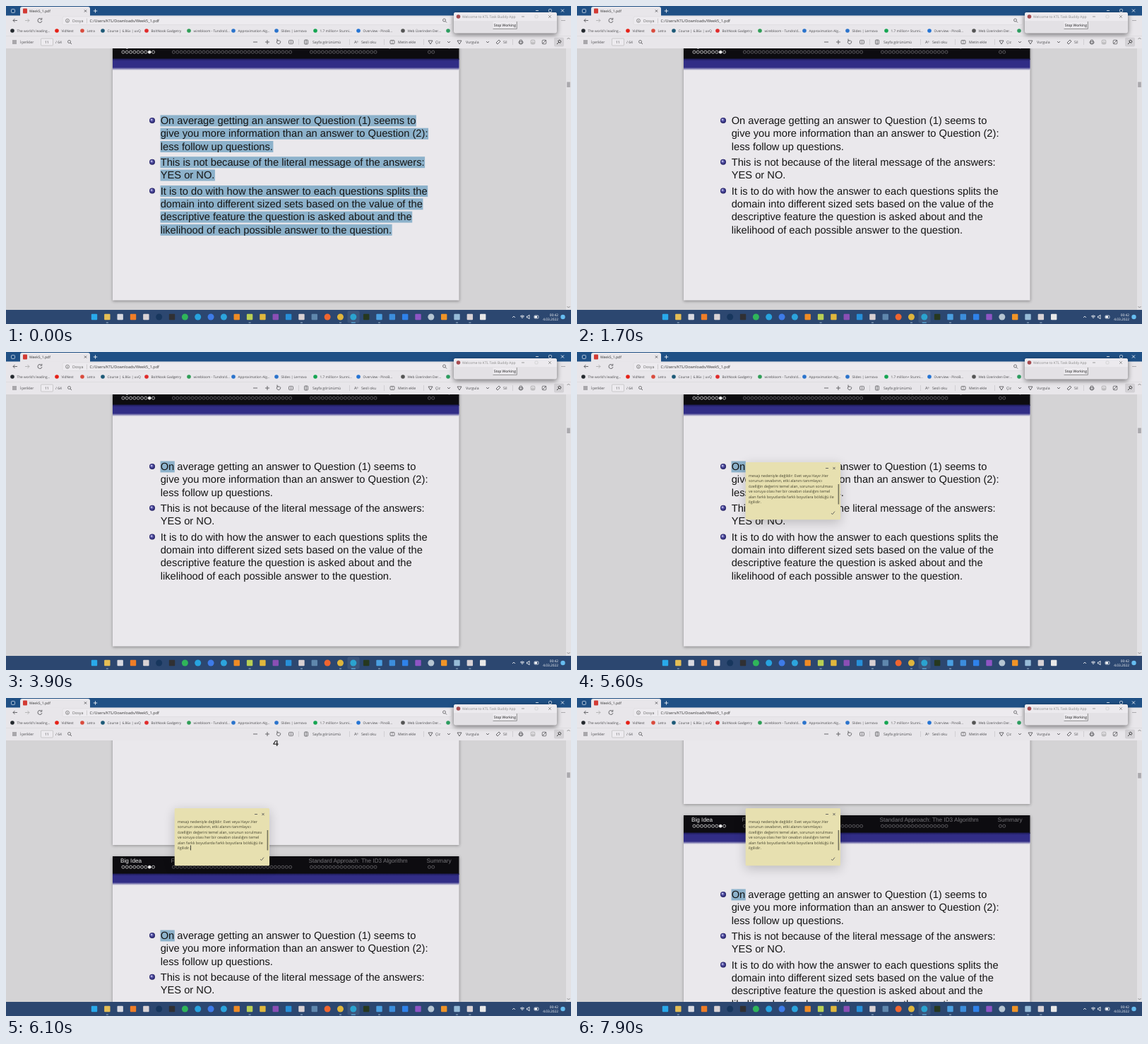
These frames come from a looping animation (800 px wide and 450 px high, 8 s). An HTML page with a canvas:

```html
<!DOCTYPE html>
<html lang="tr">
<head>
<meta charset="utf-8">
<style>
html, body { margin: 0; width: 100%; height: 100%; overflow: hidden; background: #d4d3d5 }
canvas { display: block }
</style>
</head>
<body>
<canvas width="800" height="450"></canvas>
<script>
const c = document.querySelector('canvas').getContext('2d');
c.textRendering = 'geometricPrecision';
const UI = '"Open Sans", "Noto Sans", sans-serif';
const HELV = '"Liberation Sans", Arial, sans-serif';
const PAGE = '#eae8ec', CHROME = '#e8e6ea', INK = '#4a4a4d', SELECTED = '#8db2cb';

function box(x, y, w, h, fill) {
  c.fillStyle = fill;
  c.fillRect(x, y, w, h);
}
function rounded(x, y, w, h, r, fill, stroke) {
  c.beginPath();
  c.roundRect(x, y, w, h, r);
  if (fill) { c.fillStyle = fill; c.fill(); }
  if (stroke) { c.strokeStyle = stroke; c.lineWidth = .7; c.stroke(); }
}
function disc(x, y, r, fill, stroke) {
  c.beginPath();
  c.arc(x, y, r, 0, 7);
  if (fill) { c.fillStyle = fill; c.fill(); }
  if (stroke) { c.strokeStyle = stroke; c.lineWidth = .7; c.stroke(); }
}
function arc(x, y, r, from, to, color) {
  c.beginPath();
  c.arc(x, y, r, from, to);
  c.strokeStyle = color;
  c.lineWidth = .8;
  c.stroke();
}
function text(s, x, y, size = 5, fill = INK, font = UI, align = 'left') {
  c.font = `${size}px ${font}`;
  c.textAlign = align;
  c.fillStyle = fill;
  c.fillText(s, x, y);
}
// Each argument after the colour is one polyline: [x, y, x, y, ...]
function lines(color, ...paths) {
  c.strokeStyle = color;
  c.lineWidth = .8;
  c.beginPath();
  for (const p of paths)
    for (let i = 0; i < p.length; i += 2) c[i ? 'lineTo' : 'moveTo'](p[i], p[i + 1]);
  c.stroke();
}
const dash = (x, y, r, col = INK) => lines(col, [x - r, y, x + r, y]);
const plus = (x, y, r, col = INK) => lines(col, [x - r, y, x + r, y], [x, y - r, x, y + r]);
const cross = (x, y, r, col = INK) => lines(col, [x - r, y - r, x + r, y + r], [x + r, y - r, x - r, y + r]);
const chevron = (x, y, d = 1, col = INK) => lines(col, [x - 2, y - d, x, y + d, x + 2, y - d]);
const frame = (x, y, w, h, col = INK) => rounded(x - w / 2, y - h / 2, w, h, 1, null, col);
const divider = x => box(x, 47, .6, 8, '#c2c0c4');
function magnifier(x, y) {
  disc(x - .5, y - .5, 2, null, INK);
  lines(INK, [x + 1, y + 1, x + 3, y + 3]);
}
function shadowed(color, blur, dy, paint) {
  c.save();
  c.shadowColor = color;
  c.shadowBlur = blur;
  c.shadowOffsetY = dy;
  paint();
  c.restore();
}

const body = [
  [167, 'On average getting an answer to Question (1) seems to', 1],
  [185.3, 'give you more information than an answer to Question (2):'],
  [203.6, 'less follow up questions.'],
  [225.8, 'This is not because of the literal message of the answers:', 1],
  [244.1, 'YES or NO.'],
  [266.6, 'It is to do with how the answer to each questions splits the', 1],
  [284.9, 'domain into different sized sets based on the value of the'],
  [303.2, 'descriptive feature the question is asked about and the'],
  [321.5, 'likelihood of each possible answer to the question.']
];
const sections = [
  ['Big Idea', 162, 9], ['Fundamentals', 233.5, 32],
  ['Standard Approach: The ID3 Algorithm', 428.5, 18], ['Summary', 595.5, 2]
];

const sheet = (y, h) => shadowed('#0005', 4, 1, () => box(151, y, 490.5, h, PAGE));

function bullet(x, y) {
  const g = c.createRadialGradient(x - 1.2, y - 1.4, .3, x, y, 4);
  g.addColorStop(0, '#d0d0ee');
  g.addColorStop(.4, '#5653a8');
  g.addColorStop(1, '#1d1a5c');
  disc(x, y, 4, g);
}

function slides(scroll, selection) {
  c.save();
  c.translate(0, scroll);
  sheet(-333, 367);
  text('4', 382, -106, 14.7, '#111', HELV, 'center');
  sheet(50, 366.5);

  box(151, 50, 490.5, 26, '#0d0c10');
  const g = c.createLinearGradient(0, 74.5, 0, 91);
  g.addColorStop(0, '#1c1a55');
  g.addColorStop(.2, '#312d86');
  g.addColorStop(.75, '#312d86');
  g.addColorStop(1, PAGE);
  box(151, 74.5, 490.5, 16.5, g);
  sections.forEach(([title, x, count], k) => {
    const col = k ? '#77767a' : '#f2f2f2';
    text(title, x, 59, 8.2, col, HELV);
    for (let i = 0; i < count; i++)
      disc(x + 3.9 + i * 5.33, 65.2, 2, !k && i == 7 ? '#fff' : null, col);
  });

  for (const [y, s, first] of body) {
    if (first) bullet(207, y - 5);
    const marked = selection == 'all' ? s : selection == 'word' && y == 167 ? 'On' : '';
    if (marked) {
      c.font = `14.7px ${HELV}`;
      box(218.5, y - 12.6, c.measureText(marked).width + .7, 16, SELECTED);
    }
    text(s, 218.7, y, 14.7, '#151515', HELV);
  }
  c.restore();
  box(793, 42, 7, 388, '#e2e1e4');
  box(794.2, 107.5 - scroll / 80, 4.6, 7.5, '#aaa9ad');
  chevron(796.5, 426, 1, '#777');
}

const noteLines = [
  'mesajı nedeniyle değildir: Evet veya Hayır.Her',
  'sorunun cevabının, etki alanını tanımlayıcı',
  'özelliğin değerini temel alan, sorunun sorulması',
  've soruya olası her bir cevabın olasılığını temel',
  'alan farklı boyutlarda farklı boyutlara böldüğü ile',
  'ilgilidir.'
];
function note(caret) {
  shadowed('#0003', 16, 4, () => rounded(238.7, 156, 134.3, 81.3, 1.5, '#e7e0b0'));
  dash(354, 164.5, 2);
  cross(364, 164.5, 1.6);
  noteLines.forEach((s, i) => text(s, 243, 177 + i * 7.45, 5.35, '#45432f'));
  if (caret) box(243.2 + c.measureText(noteLines[5]).width, 208.5, .8, 7, '#222');
  box(369.6, 187, 1.6, 28.5, '#77745c');
  lines(INK, [360, 228, 361.6, 229.8, 365, 225.6]);
}

const bookmarks = [
  [9, '#24292e', "The world's leading..."], [72, '#e62117', 'VidNest'],
  [108, '#d94b3d', 'Letra'], [137, '#1d5a78', 'Course | 6.86x | uvQ'],
  [199, '#e02a2a', 'BoltNook Gadgetry'], [259, '#2f9e57', "wirebloom - Tundra'd..."],
  [322, '#2a73cc', 'Approximation Alg...'], [383, '#2a73cc', 'Slides | Lernova'],
  [438, '#15a552', '1.7 million+ Stunni...'], [499, '#2474d4', 'Overview - PinoB...'],
  [562, '#555', 'Web Üzerinden Der...'], [626, '#2d9d60', '']
];
function browser() {
  box(0, 0, 800, 14, '#1f5085');
  frame(10, 7, 5, 5, '#e5edf5');
  rounded(20, 1, 99, 16, 3, CHROME);
  rounded(24, 3.5, 6, 7, 1, '#d33b34');
  text('Week5_1.pdf', 33, 8.8, 5, '#333');
  cross(112.5, 7, 1.6);
  plus(126.5, 7, 2.7, '#fff');
  dash(752, 6.5, 2, '#fff');
  frame(770.5, 6.5, 4, 4, '#fff');
  cross(788, 6.5, 2, '#fff');

  box(0, 13.5, 800, 46.5, CHROME);
  lines(INK, [16, 20.5, 10, 20.5], [12.5, 18, 10, 20.5, 12.5, 23]);
  lines('#aaa', [27, 20.5, 33, 20.5], [30.5, 18, 33, 20.5, 30.5, 23]);
  arc(48, 20.5, 3, .2, 5.4, INK);
  lines(INK, [50.8, 16.8, 50.8, 19.2, 48.4, 19.2]);
  rounded(80, 15, 551, 11.5, 2, '#edebef', '#dddbdf');
  disc(87, 20.8, 2.5, null, '#666');
  box(86.6, 20, .8, 2.2, '#666');
  text('Dosya', 94, 22.8, 5.4, '#666');
  box(114, 17.5, .6, 7, '#bbb');
  text('C:/Users/KTL/Downloads/Week5_1.pdf', 118.5, 22.8, 5.5, '#333');
  magnifier(621, 20.5);
  for (let x = 787; x < 792; x += 2) disc(x, 20.5, .5, INK);

  for (const [x, col, s] of bookmarks) {
    disc(x, 35, 2.8, col);
    text(s, x + 6.5, 36.8, 4.8);
  }

  box(0, 42, 800, .6, '#d9d7db');
  lines(INK, [9, 49, 15, 49], [9, 51, 15, 51], [9, 53, 15, 53]);
  text('İçerikler', 20, 53, 5.2);
  rounded(49.5, 46, 17, 10, 1, '#edebef', '#bbb');
  text('11', 55, 53, 5);
  text('/ 64', 70, 53, 5);
  magnifier(90, 51);
  dash(353, 51, 3);
  plus(370, 51, 3);
  arc(386, 51, 2.6, -1, 4.2, INK);
  lines(INK, [384, 46.5, 384, 49, 387, 49]);
  frame(403.5, 51, 6, 5);
  dash(403.5, 51, 1.5);
  [414, 486, 535, 591, 717].forEach(divider);
  frame(425, 51, 5, 6);
  lines(INK, [425, 48, 425, 54]);
  text('Sayfa görünümü', 434, 53, 5.2);
  text('Aᵃ', 493, 53, 5.6);
  text('Sesli oku', 503, 53, 5.2);
  frame(547, 51, 6, 5);
  text('T', 545.7, 52.6, 4.5);
  text('Metin ekle', 555, 53, 5.2);
  lines(INK, [598, 49, 601, 54, 604, 49, 598, 49]);
  text('Çiz', 608, 53, 5.2);
  chevron(627, 51);
  lines(INK, [639, 49, 642, 54, 645, 49, 639, 49]);
  text('Vurgula', 651, 53, 5.2);
  chevron(682, 51);
  lines(INK, [694, 52, 698, 48, 700, 50, 696, 54, 694, 52]);
  text('Sil', 704, 53, 5.2);
  frame(729, 51.5, 6, 3);
  frame(729, 51, 3.4, 6);
  frame(746, 51, 5.5, 5.5, '#999');
  frame(746, 52, 2.5, 2.5, '#999');
  frame(762, 51, 5.5, 5.5);
  lines(INK, [760, 53, 765, 48]);
  rounded(776, 44.5, 14, 13, 2, '#d3d1d5');
  lines('#222', [780, 54, 783, 51], [781.5, 49.5, 784.5, 52.5, 786, 50, 784, 48, 781.5, 49.5]);
  chevron(796.5, 46, -1, '#777');
}

function helperWindow() {
  shadowed('#0008', 7, 2, () => rounded(634, 9, 146, 29.5, 3, '#e3e1e5'));
  rounded(634, 9, 146, 12, [3, 3, 0, 0], '#eceaee');
  disc(640.5, 15, 2.8, '#a54b50');
  text('Welcome to KTL Task Buddy App', 646, 17, 5, '#8a8a8a');
  dash(732, 15, 2, '#888');
  frame(751, 15, 4, 4, '#ccc');
  cross(770, 15, 1.9, '#888');
  box(689.5, 22, 34, 10.5, '#eceaee');
  lines('#777', [689.5, 32.3, 723.3, 32.3, 723.3, 22]);
  text('Stop Working', 706.3, 29, 5, '#111', UI, 'center');
}

const apps = ('29a9ea e5be55 d8d9e0 ef7d27 d9d3d5 17365d 303033 2fb65a 27a3e0 3e7be8 2ca4dd ' +
  'ef8b25 b8cf55 e0b73d 8a4fb5 278fd8 d9d0d2 5f87ad f0652f dfb53c 2ba3cf ' +
  '26381f 4a9fe0 3c8ddb 2f82ea 8e55c5 b6c5d2 f09427 97bcd8 d8d2d5 e8e8e8').split(' ');
const roundApps = new Set([5, 7, 8, 9, 10, 18, 19, 20, 26]);
const runningApps = new Set([1, 12, 16, 19, 22, 28, 29]);
function taskbar() {
  box(0, 430, 800, 20, '#2c4770');
  rounded(483.5, 431.5, 17, 17, 2, '#3c567c');
  apps.forEach((hex, i) => {
    const x = 125 + i * 18.34, col = '#' + hex;
    if (roundApps.has(i)) disc(x, 440, 4.5, col);
    else rounded(x - 4.2, 435.8, 8.4, 8.4, 1, col);
    if (runningApps.has(i)) box(x - 1.5, 447.6, 3, 1, '#9fb6cc');
  });
  box(488.8, 447.6, 6, 1, '#65c3f5');
  chevron(719, 440, -1, '#fff');
  for (const r of [1.5, 3, 4.5]) arc(731, 442.5, r, -2.3, -.84, '#fff');
  lines('#fff', [737.5, 439, 739, 439, 741, 437, 741, 443, 739, 441, 737.5, 441, 737.5, 439]);
  frame(751, 440, 6, 4, '#fff');
  box(748.5, 438.6, 3.5, 2.8, '#fff');
  text('00:42', 782, 438.7, 4.8, '#fff', UI, 'right');
  text('4.03.2022', 782, 445.3, 4.8, '#fff', UI, 'right');
  disc(788.5, 440, 3.2, '#67bdf0');
}

const ease = (t, from, to) => {
  const p = Math.min(1, Math.max(0, (t - from) / (to - from)));
  return p * p * (3 - 2 * p);
};
function draw(now) {
  const t = now % 8000;
  const scroll = 174 * ease(t, 5720, 6060) - 58 * ease(t, 6140, 6380);
  const selection = t < 1350 ? 'all' : t < 3400 ? '' : 'word';
  const caret = (t + 2530) % 1060 < 530;
  box(0, 0, 800, 450, '#d4d3d5');
  slides(scroll, selection);
  if (t >= 4350) note(caret);
  browser();
  helperWindow();
  taskbar();
}
const start = performance.now();
function tick() {
  draw(performance.now() - start);
  requestAnimationFrame(tick);
}
tick();
</script>
</body>
</html>
```
